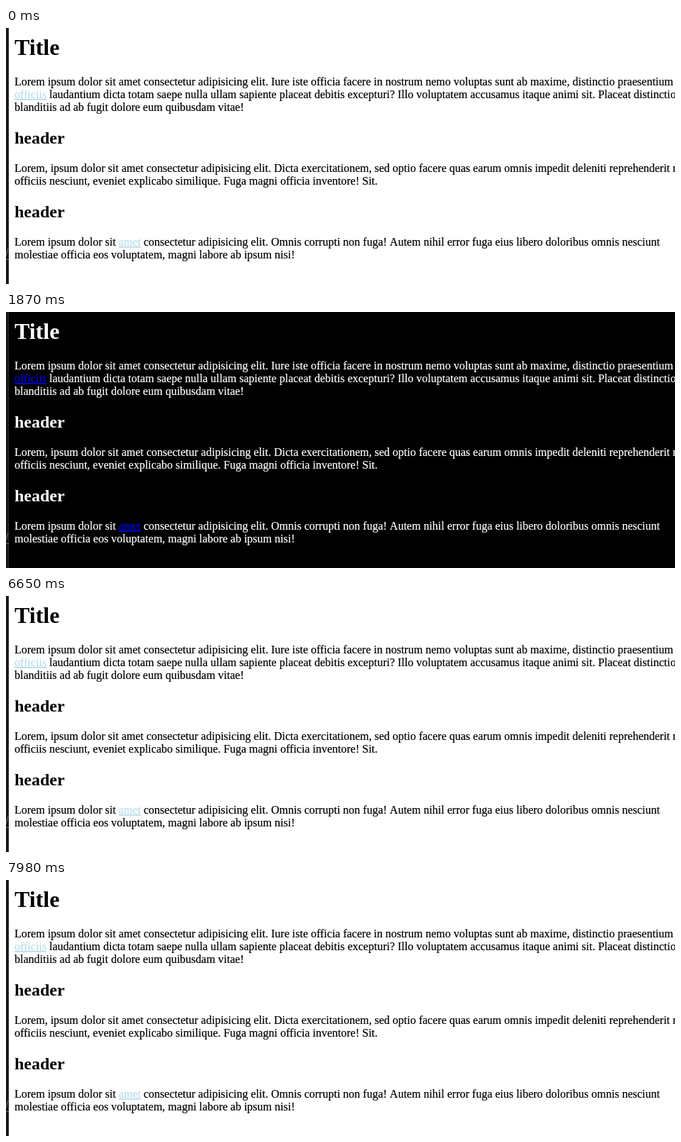
Animation of 942x361 px, one loop 8170 ms. Source, as an HTML page:

```html
<!DOCTYPE html>
<html lang="en">
<head>
<meta charset="utf-8">
<title>Theme toggle</title>
<style>
  html, body { margin: 0; width: 100%; height: 100%; overflow: hidden; background: #fff; }
  svg { display: block; width: 942px; height: 361px; }
  #page { color: #fff; fill: currentColor; }
  text, tspan { fill: currentColor; stroke: currentColor; stroke-width: .2px; }
  text { font: 16px "Liberation Serif", "Times New Roman", serif; white-space: pre; }
  .h1, .h2 { font-weight: bold; stroke: none; }
  .h1 { font-size: 32px; }
  .h2 { font-size: 24px; }
  .link { text-decoration: underline 1px; text-underline-offset: 2px; stroke: none; }
  .unkerned { font-kerning: none; }
</style>
</head>
<body>
<svg viewBox="0 0 942 361">
  <rect id="page" width="942" height="361"/>
  <g id="copy">
    <text class="h1" x="12" y="38">Title</text>
    <text x="12" y="81">Lorem ipsum dolor sit amet consectetur adipisicing elit. Iure iste officia facere in nostrum nemo voluptas sunt ab maxime, distinctio praesentium</text>
    <text x="12" y="99"><tspan class="link">officiis</tspan> laudantium dicta totam saepe nulla ullam sapiente placeat debitis excepturi? Illo voluptatem accusamus itaque animi sit. Placeat distinctio</text>
    <text x="12" y="117">blanditiis ad ab fugit dolore eum quibusdam vitae!</text>
    <text class="h2" x="12" y="163">header</text>
    <text x="12" y="203">Lorem, ipsum dolor sit amet consectetur adipisicing elit. Dicta exercitationem, sed optio facere quas earum omnis impedit deleniti reprehenderit rem</text>
    <text x="12" y="221">officiis nesciunt, eveniet explicabo similique. Fuga magni officia inventore! Sit.</text>
    <text class="h2" x="12" y="267">header</text>
    <text x="12" y="307">Lorem ipsum dolor sit <tspan class="link">amet</tspan> consectetur adipisicing elit. Omnis corrupti non fuga!<tspan class="unkerned"> </tspan>Autem nihil error fuga eius libero doloribus omnis nesciunt</text>
    <text x="12" y="325">molestiae officia eos voluptatem, magni labore ab ipsum nisi!</text>
  </g>
  <!-- sliver of the editor beside the page -->
  <rect width="4" height="361" fill="#181818"/>
  <rect x="3" width="1" height="361" fill="#2b2b2b"/>
  <path d="M0 321L3 311M0 326.5H4" fill="none" stroke="#6a6a6a"/>
</svg>
<script>
const LOOP = 8170;
const light = { page: '#fff', text: '#000', link: '#add8e6' };
const dark = { page: '#000', text: '#fff', link: '#00f' };
const steps = [[0, light], [1870, dark], [3190, light], [5130, dark], [6650, light], [LOOP, light]];

function cycle(selector, part) {
  const frames = steps.map(([ms, theme]) => ({
    offset: ms / LOOP, color: theme[part], easing: 'step-end'
  }));
  for (const el of document.querySelectorAll(selector)) {
    el.animate(frames, { duration: LOOP, iterations: Infinity });
  }
}

cycle('#page', 'page');
cycle('#copy', 'text');
cycle('.link', 'link');
</script>
</body>
</html>
```
